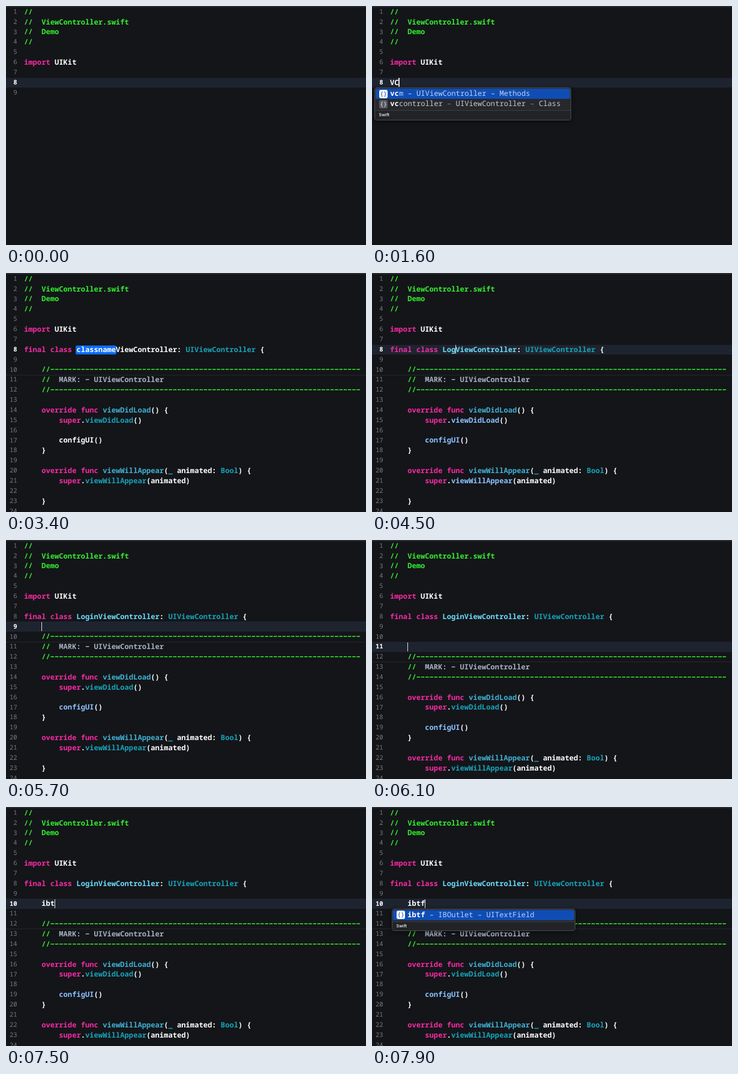
These frames come from a looping animation (600 by 399 pixels, 8 s). An HTML page:

```html
<!DOCTYPE html>
<html lang="en">
<head>
<meta charset="utf-8">
<title>Code editor</title>
<style>
  html, body { margin: 0; width: 100%; height: 100%; overflow: hidden; background: #141519; }
  #stage {
    position: relative; width: 600px; height: 399px; overflow: hidden;
    background: #141519; color: #fff;
    font: 500 12.15px/16.86px "Noto Sans Mono", "DejaVu Sans Mono", monospace;
    text-rendering: geometricPrecision; font-variant-ligatures: none;
  }
  #stage div { position: absolute; white-space: pre; box-sizing: border-box; }
  .top { left: 0; top: 0; width: 600px; height: 1.5px; background: #2a2b30; }
  .row { left: 0; width: 600px; height: 16.86px; background: #1e242f; }
  .rule { left: 0; width: 600px; height: 1px; background: #25262b; }
  .num { left: 0; width: 18.7px; text-align: right; font-size: 10.6px; color: #777a82; }
  .num.on { color: #fff; font-weight: 600; }
  .line { left: 30px; font-weight: 600; }
  .caret { width: 1.2px; height: 15px; background: #dfe0e4; }
  .mark { height: 15.2px; border-radius: 2.5px; background: #0a6cff; }
  .k { color: #f62aa4; }
  .g { color: #33ee2e; }
  .m { color: #a3b1c0; font-weight: 700; }
  .f { color: #3fb0d2; }
  .c { color: #16a3b8; }
  .d { color: #6bdcfb; }
  .p { color: #8ac2ff; }
  .popup {
    border: 1px solid #4b4c50; border-radius: 4px; background: #27282b;
    box-shadow: 0 2px 6px #0008; overflow: hidden;
  }
  .pick { left: 1.5px; right: 1.5px; height: 16.6px; border-radius: 3px; background: #0f4db5; }
  .item { left: 25.8px; color: #c8c9cc; }
  .item i { font-style: normal; color: #85868a; }
  .item b { color: #fff; }
  .item.on, .item.on i { color: #bcd2f6; }
  .icon {
    left: 7.5px; width: 14px; height: 14px; border-radius: 3px; text-align: center;
    background: #5a5b5f; color: #e6e6e8; font-size: 10px; line-height: 13px; letter-spacing: -.3px;
  }
  .icon.on { background: #fff; color: #123f8e; }
  .foot {
    left: 0; right: 0; bottom: 0; height: 15.5px; padding-left: 7px;
    border-top: 1px solid #3d3e42; background: #222326;
    font: 500 7.2px/14.5px Inter, "Open Sans", sans-serif;
  }
</style>
</head>
<body>
<div id="stage"></div>
<script>
const LOOP = 8000, PITCH = 16.86, CELL = 7.29, LEFT = 30, TOP = 1.57;
const stage = document.getElementById("stage");

const span = cls => text => `<span class="${cls}">${text}</span>`;
const [k, g, m, f, c, d, p] = [..."kgmfcdp"].map(span);
const box = (cls, style, html = "") => `<div class="${cls}" style="${style}">${html}</div>`;
const rowTop = n => TOP + (n - 1) * PITCH;

const header = [
  g("//"), g("//  ViewController.swift"), g("//  Demo"), g("//"), "",
  k("import") + " UIKit", ""
];
const dashes = "    " + g("//" + "\u2212".repeat(71));

// Colouring of declared names, own calls and inherited calls as the index catches up
const plain = text => text;
const fresh = { name: plain, own: plain, inherited: c };
const typing = { name: d, own: p, inherited: p };
const settled = { name: d, own: p, inherited: c };

function classLines(name, tone, inner) {
  return [
    `${k("final class")} ${tone.name(name + "ViewController")}: ${c("UIViewController")} {`,
    ...inner,
    dashes,
    "    " + g("//") + "  " + m("MARK: \u2212 UIViewController"),
    dashes,
    "",
    `    ${k("override func")} ${f("viewDidLoad")}() {`,
    `        ${k("super")}.${tone.inherited("viewDidLoad")}()`,
    "",
    `        ${tone.own("configUI")}()`,
    "    }",
    "",
    `    ${k("override func")} ${f("viewWillAppear")}(${c("_")} animated: ${c("Bool")}) {`,
    `        ${k("super")}.${tone.inherited("viewWillAppear")}(animated)`,
    "",
    "    }",
    ""
  ];
}

const methods = ["vc", "m", "UIViewController", "Methods"];
const classItem = ["vc", "controller", "UIViewController", "Class"];
const outlet = ["ibtf", "", "IBOutlet", "UITextField"];

// Each step: start, lines after the header, caret row and column, extras
const steps = [];
const add = (at, lines, row, col, extra = {}) => steps.push({ at, lines, row, col, ...extra });
const menu = (items, pick, x, width) => ({ menu: { items, pick, x, width } });

add(0, ["", ""], 8, 0);
add(1200, ["V", ""], 8, 1);
add(1400, ["VC", ""], 8, 2);
add(1600, ["VC", ""], 8, 2, menu([methods, classItem], 0, 3.5, 328.5));
add(1900, ["VC", ""], 8, 2, menu([methods, classItem], 1, 3.5, 328.5));
add(2400, classLines("classname", fresh, [""]), 8, 12, { select: 9 });
["L", "Lo", "Log", "Logi", "Login"].forEach((name, i) =>
  add([3900, 4200, 4400, 4700, 4900][i], classLines(name, i ? typing : fresh, [""]), 8, 13 + i));
const login = inner => classLines("Login", settled, inner);
add(5500, login([""]), 9, 4);
add(5800, login(["", ""]), 10, 4);
add(5900, login(["", "", ""]), 11, 4);
add(6200, login(["", "", ""]), 10, 4);
["i", "ib", "ibt", "ibtf"].forEach((word, i) =>
  add([6800, 7000, 7400, 7600][i], login(["", "    " + word, ""]), 10, 5 + i));
add(7700, login(["", "    ibtf", ""]), 10, 8, menu([outlet], 0, 32.5, 306.5));

function drawMenu({ items, pick, x, width }, row) {
  let html = "";
  items.forEach(([hit, rest, owner, kind], i) => {
    const on = i === pick ? " on" : "", y = 1.2 + i * PITCH;
    if (on) html += box("pick", `top:${y}px`);
    html += box("icon" + on, `top:${y + 1.3}px`, "{}");
    html += box("item" + on, `top:${y}px`,
      `<b>${hit}</b>${rest} <i>\u2013</i> ${owner} <i>\u2013</i> ${kind}`);
  });
  html += box("foot", "", "Swift");
  const height = 20.6 + items.length * PITCH;
  return box("popup", `left:${x}px;top:${rowTop(row + 1) - .2}px;width:${width}px;height:${height}px`, html);
}

function draw(s) {
  const lines = [...header, ...s.lines], x = LEFT + s.col * CELL;
  let html = box("top", "");
  if (!s.select) html += box("row", `top:${rowTop(s.row)}px`);
  lines.forEach((text, i) => {
    const y = rowTop(i + 1);
    if (y > 399) return;
    if (text.includes("MARK")) html += box("rule", `top:${Math.floor(y)}px`);
    if (s.select && i + 1 === s.row)
      html += box("mark", `left:${x - 1}px;top:${y + 1}px;width:${s.select * CELL + 2}px`);
    html += box(i + 1 === s.row ? "num on" : "num", `top:${y + .3}px`, i + 1);
    html += box("line", `top:${y + .1}px`, text);
  });
  if (!s.select) html += box("caret", `left:${x - .2}px;top:${rowTop(s.row) + .9}px`);
  if (s.menu) html += drawMenu(s.menu, s.row);
  stage.innerHTML = html;
}

// The idle caret fades in and out; it stays lit while typing
function caretAlpha(t) {
  if (t >= 1200) return 1;
  if (t < 800) return Math.min(1, Math.max(0, (t - 200) / 300));
  return Math.max(0, 1 - (t - 700) / 300);
}

let shown = null;
function frame(now) {
  const t = Math.floor((now % LOOP) / 100) * 100;
  const step = steps.findLast(s => s.at <= t);
  if (step !== shown) draw(shown = step);
  const caret = stage.querySelector(".caret");
  if (caret) caret.style.opacity = caretAlpha(t);
  requestAnimationFrame(frame);
}
frame(0);
</script>
</body>
</html>
```
